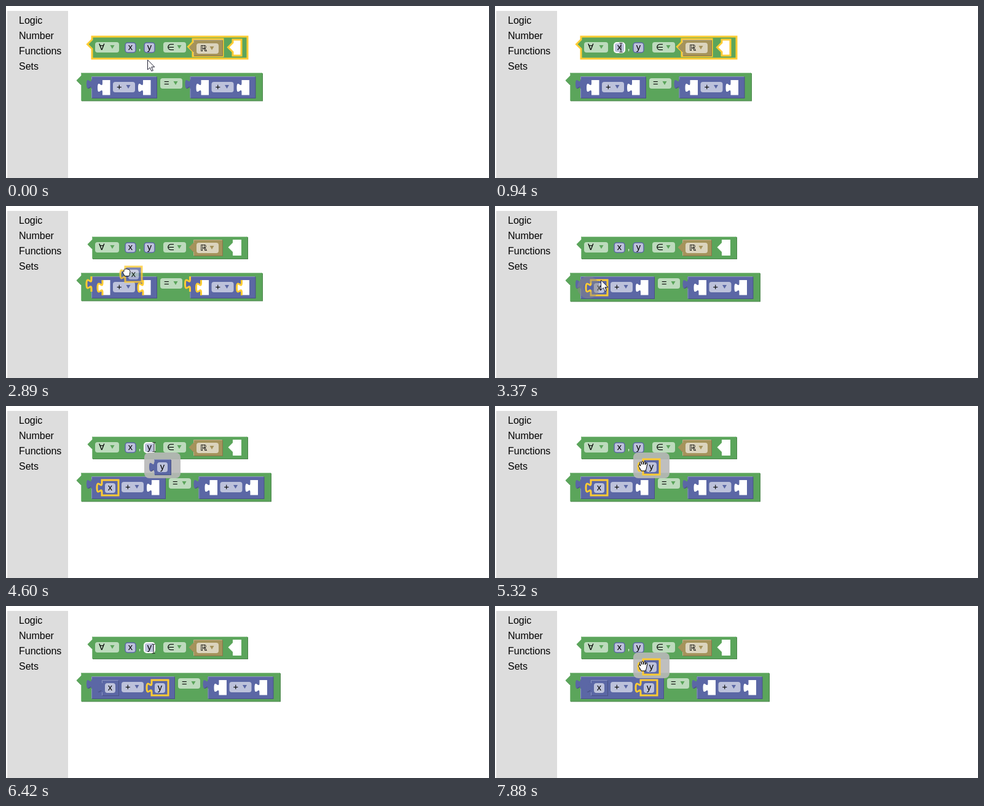
These frames come from a looping animation (786x281 px, 8000 ms). An HTML page:

```html
<!DOCTYPE html>
<html lang="en">
<head>
<meta charset="utf-8">
<title>Block editor</title>
<style>
  html, body { margin: 0; width: 100%; height: 100%; overflow: hidden; background: #fff; }
  svg { display: block; }
  text { font: 14.67px "Liberation Sans", Arial, sans-serif; }
  .menu text { font-size: 16px; }
  .sym { font: 14px "DejaVu Sans", sans-serif; }
</style>
</head>
<body>
<svg id="stage" width="786" height="281" viewBox="0 0 786 281"></svg>
<script>
const LOOP = 8000;
const YELLOW = '#fc3';
const GREEN = { main: '#5ba55b', light: '#8cc08c', dark: '#498449' };
const BLUE = { main: '#5b67a5', light: '#8c95c0', dark: '#495284' };
const BROWN = { main: '#a5935b', light: '#c0b38c', dark: '#847649' };

// time, pointer x, pointer y, pointer kind
const STEPS = [
  [0, 230.5, 88, 'arrow'], [340, 230.5, 88, 'arrow'],
  [580, 226, 85, 'arrow'], [700, 218, 79, 'arrow'], [820, 209, 72, 'beam'], [940, 205, 68, 'beam'],
  [1570, 205, 68, 'beam'],
  [1820, 205, 70, 'beam'], [1940, 206, 79, 'hand'], [2060, 208, 85, 'hand'],
  [2180, 210, 90, 'hand'], [2300, 212, 94, 'hand'], [2420, 212, 95, 'hand'],
  [2660, 208, 99, 'fist'], [2780, 196, 108, 'fist'], [2900, 180, 121, 'fist'],
  [3020, 166, 130, 'fist'], [3140, 160, 130, 'fist'],
  [3370, 172.5, 121, 'arrow'], [3490, 195, 102, 'arrow'], [3610, 222, 82, 'arrow'],
  [3740, 237, 70, 'beam'], [3870, 241, 67, 'beam'],
  [4600, 241, 67, 'beam'], [4720, 241, 69, 'beam'], [4840, 241, 79, 'hand'], [4960, 241, 86, 'hand'],
  [5080, 241, 92, 'hand'], [5200, 241, 97, 'hand'], [5320, 241, 98, 'hand'],
  [5440, 240, 102, 'fist'], [5560, 240, 110, 'fist'], [5680, 241, 120, 'fist'], [5800, 242, 127, 'fist'],
  [6060, 246, 116, 'arrow'], [6180, 244, 98, 'arrow'], [6300, 241, 80, 'arrow'], [6420, 240, 70, 'beam'],
  [7150, 240, 70, 'beam'],
  [7400, 241, 71, 'beam'], [7520, 241, 82, 'hand'], [7640, 241, 90, 'hand'],
  [7760, 241, 96, 'hand'], [7880, 241, 98, 'hand']
];

const TAB_UP = 'c0,-10 -8,8 -8,-7.5 s8,2.5 8,-7.5';
const TRI_UP = 'l-7.5,-7.5 7.5,-7.5';

const outline = (x, y, w, h, tab) => `M${x},${y}h${w}v${h}h${-w}V${y + 20}${tab}Z`;
const path = (d, attrs) => `<path d="${d}" ${attrs}/>`;
const rect = (x, y, w, h, attrs) => `<rect x="${x}" y="${y}" width="${w}" height="${h}" ${attrs}/>`;
const text = (x, y, s, attrs = '') => `<text x="${x}" y="${y}" ${attrs}>${s}</text>`;
const strokeIf = on => on ? `stroke="${YELLOW}" stroke-width="3"` : '';

function block(x, y, w, h, col, tab, selected) {
  const d = outline(x, y, w, h, tab);
  const edge = `M${x + w - .5},${y + .5}H${x + .5}V${y + 5}M${x + .5},${y + 20}V${y + h}`;
  return path(d, `fill="${col.dark}" transform="translate(1 1)"`) +
    path(d, `fill="${col.main}" ${strokeIf(selected)}`) +
    (selected ? '' : path(edge, `fill="none" stroke="${col.light}"`));
}

const hole = (x, y, w, h, tab, selected) =>
  path(outline(x, y, w, h, tab), `fill="#fff" ${strokeIf(selected)}`);

const glow = (x, y) =>
  path(`M${x},${y + 25}v-5${TAB_UP}v-5`, `fill="none" ${strokeIf(true)}`);

function dropdown(x, y, w, label, col, cls = '') {
  const ax = x + w - 14.5;
  return rect(x, y, w, 17, 'rx="4" fill="#fff" fill-opacity=".6"') +
    text(x + 6, y + 12.5, label, `class="${cls}"`) +
    path(`M${ax},${y + 5}h7l-3.5,6Z`, `fill="${col.main}"`);
}

const field = (x, y, name, attrs = '') =>
  rect(x, y, 17, 16, `rx="4" fill="#bdc2db" ${attrs}`) +
  text(x + 8.5, y + 12, name, 'text-anchor="middle"');

const variable = (x, y, name, selected) =>
  block(x, y, 27, 25, BLUE, TAB_UP, selected) + field(x + 5, y + 5, name);

function menu() {
  const items = ['Logic', 'Number', 'Functions', 'Sets'];
  return '<g class="menu">' + rect(2, 8, 99, 273, 'fill="#ddd"') +
    items.map((s, i) => text(21, 29 + 25 * i, s)).join('') + '</g>';
}

function quantifier(selected, hover, dy) {
  const border = name => hover === name
    ? 'stroke="#fff" stroke-width="2"' : `stroke="${BLUE.main}" stroke-width="1.5"`;
  return block(140, 50, 253, 36, GREEN, TRI_UP, selected) +
    (selected ? path(outline(304, 54, 49, 28, TRI_UP), `fill="none" ${strokeIf(true)}`) : '') +
    hole(369, 55, 14, 26, TRI_UP, selected) +
    block(305, 55, 47, 26, BROWN, TRI_UP) +
    dropdown(145, 59, 39, '∀', GREEN, 'sym') +
    field(194, 60, 'x', border('x')) + text(215.5, 72, ',', 'fill="#fff"') +
    field(225, 60, 'y', border('y')) +
    dropdown(256, 59, 37, '∈', GREEN, 'sym') +
    dropdown(310, 60 + dy, 36, 'ℝ', BROWN, 'sym');
}

function sum(x, h, left, right) {
  const a = left ? 14 : 0, b = right ? 15 : 0;
  const slot = (sx, arg) => arg
    ? variable(sx - 1, 121, arg.name, arg.selected) : hole(sx, 121, 12.5, 24.5, TAB_UP);
  return block(x, 115, 106 + a + b, h, BLUE, TAB_UP) +
    slot(x + 18, left) + dropdown(x + 35 + a, 124, 36, '+', BLUE) + slot(x + 84 + a + (right ? 1 : 0), right);
}

function equation(s) {
  const shift = s.hasY ? 29 : s.hasX ? 14 : 0;
  const grow = s.hasX ? 1 : 0;
  const x = s.hasX && { name: 'x', selected: s.selected === 'x' };
  const y = s.hasY && { name: 'y', selected: s.selected === 'y' };
  let out = block(122, 109, 295 + shift, 45.5 + grow, GREEN, TRI_UP) +
    sum(139, 35 + grow, x, y) +
    dropdown(251 + shift, 118, 36, '=', GREEN) +
    sum(299.5 + shift, 35 + grow);
  if (s.dragging) {
    const r = 299.5 + shift;
    out += glow(139, 115) + glow(s.hasX ? 156 : 157, 121) + glow(223 + shift, 121) +
      glow(r, 115) + glow(r + 18, 121) + glow(r + 84, 121);
  }
  return out;
}

function popup(name, pressed) {
  const x = name === 'x' ? 194 : 225;
  return rect(x, 76, 59, 42, 'rx="8" fill="#b8b8b8" fill-opacity=".9"') +
    variable(x + 16, 87, name, pressed);
}

const CURSORS = {
  arrow: path('M0,0V16L3.8,12.6L6.4,18.4L8.8,17.3L6.3,11.7H11.3Z', 'fill="#fff" stroke="#223"'),
  beam: path('M-2.5,-7.5h2l.5,.5 .5,-.5h2M0,-7V7M-2.5,7.5h2l.5,-.5 .5,.5h2', 'fill="none" stroke="#222"'),
  hand: path('M-3,8C-4,5 -7,2 -7.5,-.5C-7.5,-2 -5.5,-2 -4,0L-5.5,-5C-5.5,-7 -3.5,-7 -3,-5L-2,-2.5' +
    'L-2.2,-6.5C-2,-8.3 0,-8.3 .2,-6.5L.6,-2.5L1.6,-6.3C2.2,-8 4,-7.5 3.7,-5.8L3.3,-2' +
    'L5,-4.3C6.3,-5.3 7.4,-4.2 6.8,-3C6,-1 5.8,4 4,8Z', 'fill="#fff" stroke="#000"'),
  fist: path('M-3,6.5C-3.5,4 -6,2.5 -6,0C-6,-1.5 -4.5,-1.5 -4,-1V-3.5C-3.5,-5.5 -1.5,-5.5 -1,-4.5' +
    'C0,-6 2,-5.5 2.2,-4.2C3.5,-5 5,-4.3 5.2,-2.5C6.3,-2 6,0 5.5,2C5.2,4 4.5,5 4.3,6.5Z',
    'fill="#fff" stroke="#000"')
};

const ripple = (x, y) =>
  `<circle cx="${x}" cy="${y}" r="13" fill="none" stroke="#888" stroke-width="10" opacity=".5"/>`;

function scene([t, px, py, kind]) {
  const within = (a, b) => t >= a && t < b;
  const dragX = within(2660, 3370), dragY = within(5440, 6060);
  const state = {
    hasX: t >= 3370,
    hasY: t >= 6060,
    dragging: dragX || dragY,
    selected: within(3370, 5440) ? 'x' : t >= 6060 ? 'y' : ''
  };
  const hover = kind === 'beam' ? (t < 2660 ? 'x' : 'y') : '';
  let out = menu() + quantifier(t < 2660, hover, t < 340 ? 1 : 0) + equation(state);

  if (within(1570, 2660)) out += popup('x', t >= 2420);
  if (within(4600, 5440)) out += popup('y', t >= 5320);
  if (t >= 7150) out += popup('y', t >= 7880);

  if (dragX) out += `<g opacity=".8">${variable(px - 2, py - 9, 'x', true)}</g>`;
  if (dragY) out += `<g opacity=".8">${variable(px + .5, py - 13.5, 'y', true)}</g>`;

  if (t === 3370) out += ripple(152, 133);
  if (t === 6060) out += ripple(233, 133);
  return out + `<g transform="translate(${px} ${py})">${CURSORS[kind]}</g>`;
}

const stage = document.getElementById('stage');
let shown = null;

function tick() {
  const t = performance.now() % LOOP;
  const step = STEPS.findLast(s => s[0] <= t);
  if (step !== shown) stage.innerHTML = scene(shown = step);
  requestAnimationFrame(tick);
}
tick();
</script>
</body>
</html>
```
